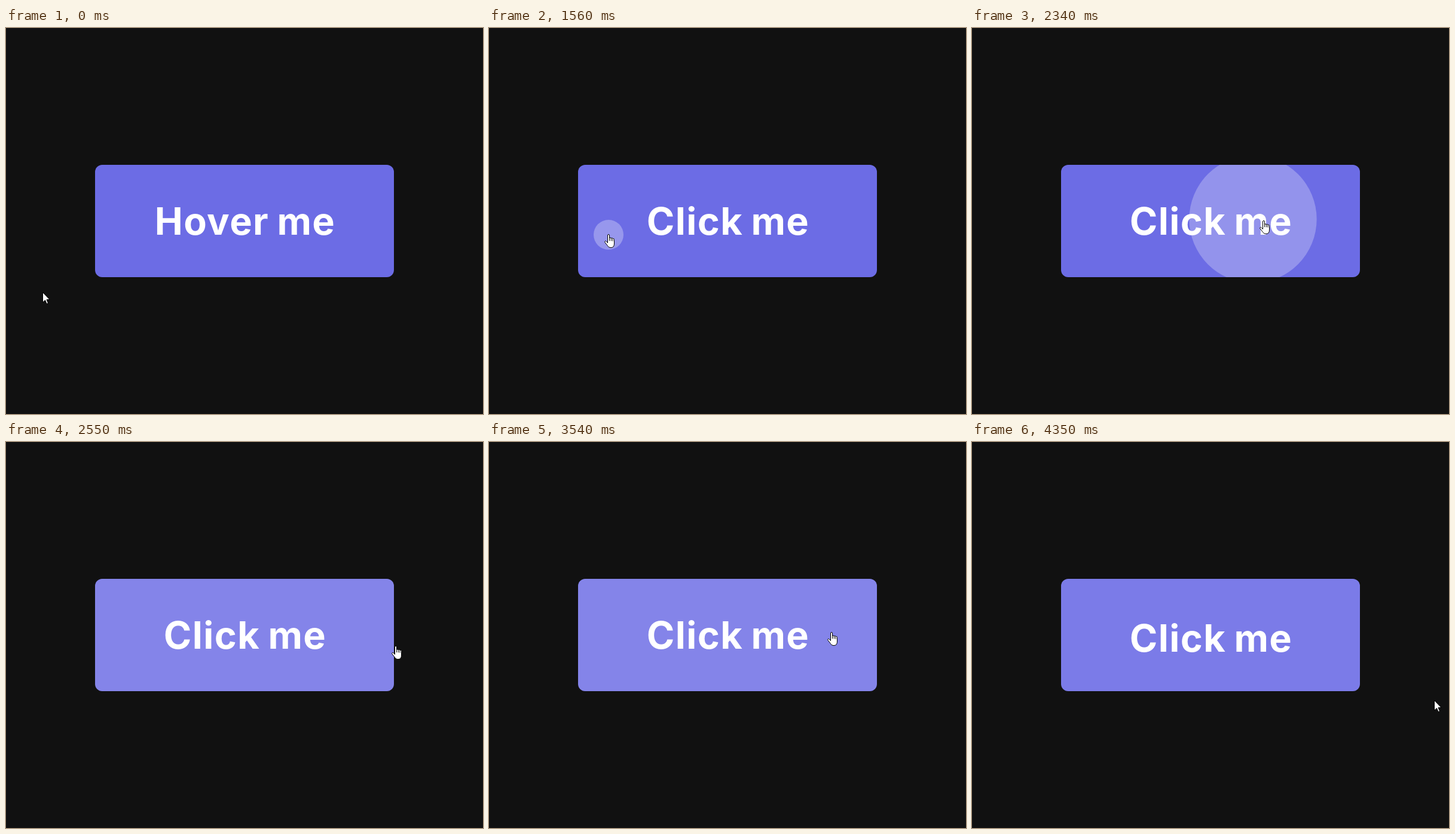
An HTML page that plays this animation: 798x646 px, repeating every 4.38 s.

```html
<!DOCTYPE html>
<html lang="en">
<head>
<meta charset="utf-8">
<title>Hover button</title>
<style>
  html, body { margin: 0; width: 100%; height: 100%; overflow: hidden; background: #111; }
  svg { display: block; width: 798px; height: 646px; }
  text {
    font: 650 63px Poppins, Inter, sans-serif;
    letter-spacing: 1.4px;
    word-spacing: -3px;
    text-anchor: middle;
    fill: #fff;
  }
</style>
</head>
<body>
<svg viewBox="0 0 798 646">
  <defs>
    <clipPath id="face"><rect x="149" y="229" width="500" height="188" rx="12"/></clipPath>
  </defs>
  <g clip-path="url(#face)">
    <rect x="149" y="229" width="500" height="188" fill="#6c6ce5"/>
    <g id="labels">
      <text x="400" y="345.5">Hover me</text>
      <text x="400" y="533.5">Click me</text>
    </g>
    <g id="ripples" fill="#fff"></g>
  </g>
  <g id="cursor" stroke="#000" stroke-linejoin="round">
    <path id="arrow" fill="#fff" d="M-.5-.5V16L3.5 12.5 6 18.5l2.5-1L6 11.5H11z"/>
    <g id="hand" transform="translate(-7 0)">
      <path fill="#fff" d="M5.5 14.5V2a1.5 1.5 0 0 1 3 0V7.2a1.4 1.4 0 0 1 2.8 .2a1.4 1.4 0 0 1 2.7 .9a1.3 1.3 0 0 1 2.5 1V16q0 6.5-5.5 6.5h-1q-3 0-4.5-3L.9 13.6q-.8-1.6.8-2.1 1.2-.2 2.3 1.4z"/>
      <path fill="none" d="M8.5 7.2v4M11.3 7.4v4M14 8.3v3.4"/>
    </g>
  </g>
</svg>
<script>
const LOOP = 4380, STEP = 30;
const HOVER = { enter: 617, leave: 4275 };
const SLIDE = { time: 300, height: 188 };
const RIPPLE = { time: 600, radius: 1000, alpha: 0.3 };

// Pointer tip at key moments
const stops = [
  { at: 0, x: 62, y: 443 },
  { at: 450, x: 62, y: 443 },
  { at: 750, x: 263, y: 327 },
  { at: 1170, x: 200, y: 346 },
  { at: 1545, x: 200, y: 346, click: true },
  { at: 1770, x: 207, y: 297 },
  { at: 1950, x: 300, y: 224 },
  { at: 2276, x: 470, y: 320, click: true },
  { at: 2550, x: 652, y: 341 },
  { at: 3259, x: 577, y: 300, click: true },
  { at: 3950, x: 560, y: 375, click: true },
  { at: 4350, x: 774, y: 433 }
];

const $ = id => document.getElementById(id);
const clamp = v => Math.min(1, Math.max(0, v));
const easeIn = p => p ** 1.6;
const quartInOut = p => p < 0.5 ? 8 * p ** 4 : 1 - 8 * (1 - p) ** 4;
const slide = (t, start) => quartInOut(clamp((t - start) / SLIDE.time));

const ripples = stops.filter(s => s.click).map(({ at, x, y }) => {
  const circle = document.createElementNS("http://www.w3.org/2000/svg", "circle");
  circle.setAttribute("cx", x);
  circle.setAttribute("cy", y);
  return { at, circle: $("ripples").appendChild(circle) };
});

function pointerAt(t) {
  const i = Math.max(1, stops.findIndex(s => s.at >= t));
  const a = stops[i - 1], b = stops[i];
  const k = easeIn((t - a.at) / (b.at - a.at));
  return [a.x + (b.x - a.x) * k, a.y + (b.y - a.y) * k].map(Math.round);
}

function draw(t) {
  const shift = SLIDE.height * (slide(t, HOVER.leave) - slide(t, HOVER.enter));
  $("labels").setAttribute("transform", `translate(0 ${shift})`);

  for (const { at, circle } of ripples) {
    const p = clamp((t - at) / RIPPLE.time);
    circle.setAttribute("r", RIPPLE.radius * p);
    circle.setAttribute("opacity", RIPPLE.alpha * (1 - p));
  }

  const over = t > HOVER.enter && t < HOVER.leave;
  $("hand").style.display = over ? "" : "none";
  $("arrow").style.display = over ? "none" : "";
  $("cursor").setAttribute("transform", `translate(${pointerAt(t)})`);
}

const start = performance.now();
function tick() {
  const t = (performance.now() - start) % LOOP;
  draw(Math.floor(t / STEP) * STEP);
  requestAnimationFrame(tick);
}
draw(0);
requestAnimationFrame(tick);
</script>
</body>
</html>
```
